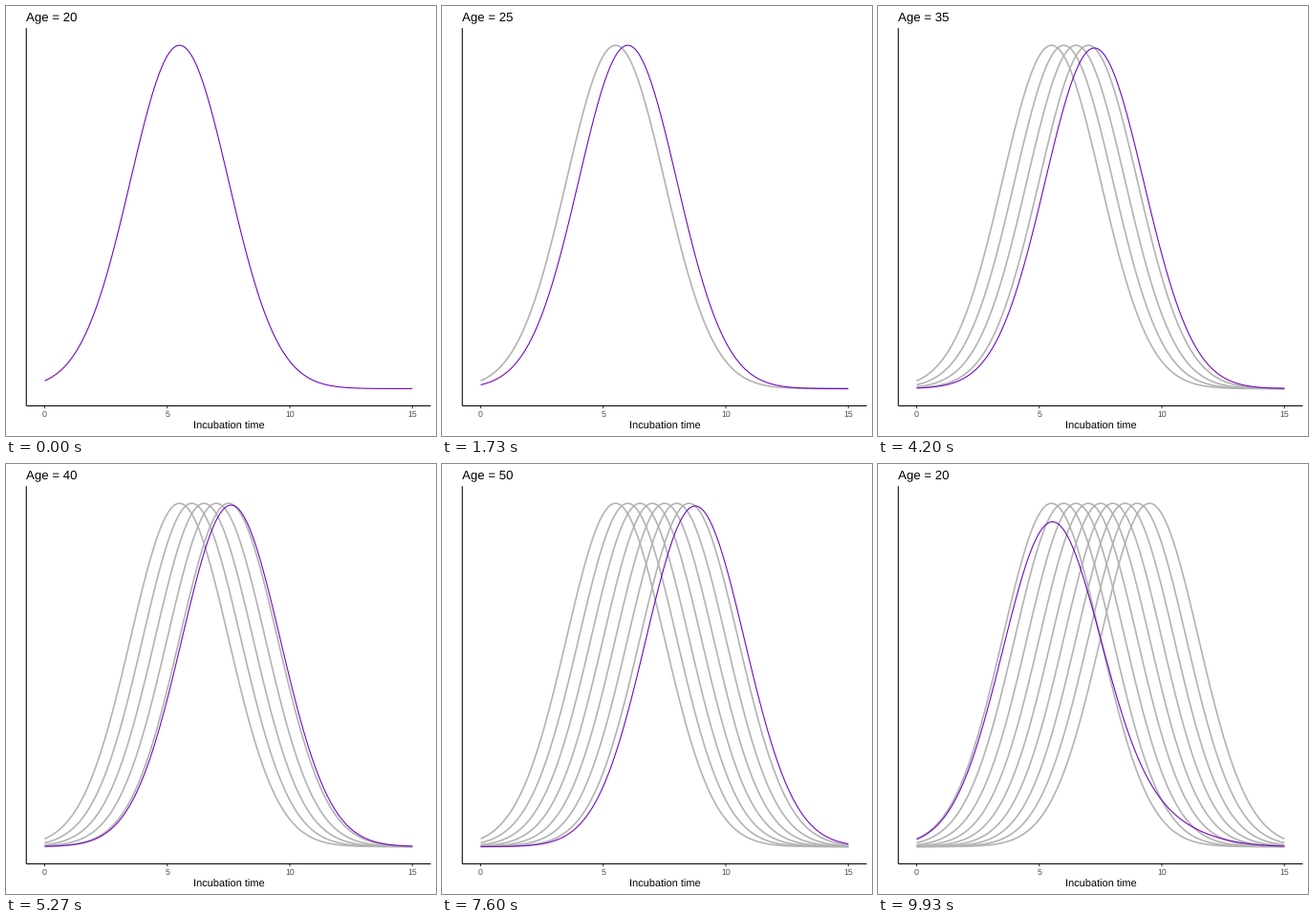
A matplotlib script that plays this animation: 450x450 px, repeating every 10 s.

```python
import numpy as np
import matplotlib.pyplot as plt
from matplotlib.animation import FuncAnimation

plt.rcParams["font.family"] = "Liberation Sans"
plt.rcParams["text.hinting"] = "none"
plt.rcParams["path.simplify"] = False

SIZE, DPI = 450, 72
FRAMES, LOOP_MS = 150, 10000
STEPS = 8                                     # frames per transition
STARTS = [9, 26, 43, 60, 77, 94, 111, 127, 143]

LEFT, RIGHT, TOP, BOTTOM = 21.25, 444.5, 23.2, 418.4
PURPLE, GREY = "#7000c0", "#b3b3b3"
LINE = 1.07

ages = [20 + 5 * i for i in range(len(STARTS))]
times = np.linspace(0, 15, 500)
curves = [np.exp(-(times - (5.5 + 0.5 * i)) ** 2 / 8) for i in range(len(ages))]


def to_x(t):
    return LEFT + (RIGHT - LEFT) * (0.05 + t / 15) / 1.1


def to_y(v):
    return BOTTOM - (BOTTOM - TOP) * (0.05 + v) / 1.1


def ease(t):
    """Cubic in-out."""
    return 4 * t ** 3 if t < 0.5 else 1 - 4 * (1 - t) ** 3


def pose(frame):
    """Return the state index and the progress towards the next state."""
    state = 0
    for start in STARTS:
        if frame < start:
            break
        t = (frame - start + 1) / STEPS
        if t < 1:
            return state, t
        state += 1
    return state, 0


fig = plt.figure(figsize=(SIZE / DPI, SIZE / DPI), dpi=DPI, facecolor="white")
ax = fig.add_axes([0, 0, 1, 1])
ax.set_xlim(0, SIZE)
ax.set_ylim(SIZE, 0)
ax.axis("off")


def stroke(xs, ys, color, width=LINE, **kw):
    return ax.plot(xs, ys, color=color, lw=width, solid_capstyle="butt",
                   solid_joinstyle="round", snap=False, **kw)[0]


def label(x, y, text, size, color="black", ha="center"):
    return ax.text(x, y, text, size=size, color=color, ha=ha, va="baseline")


xs = to_x(times)
marks = [stroke(xs, to_y(c), GREY, 1.65, zorder=2) for c in curves]
curve = stroke(xs, to_y(curves[0]), PURPLE, zorder=3)

for tick in (0, 5, 10, 15):
    stroke([to_x(tick)] * 2, [BOTTOM, BOTTOM + 2.75], "#333333")
    label(to_x(tick), 430, str(tick), 8.8, "#4d4d4d")
stroke([LEFT, LEFT], [TOP, BOTTOM], "black", zorder=4)
stroke([LEFT, RIGHT], [BOTTOM, BOTTOM], "black", zorder=4)
label((LEFT + RIGHT) / 2, 443.3, "Incubation time", 11)
title = label(LEFT - 0.2, 15, "", 13.2, ha="left")


def draw(frame):
    state, t = pose(frame)
    following = (state + 1) % len(ages)
    k = ease(t)
    curve.set_ydata(to_y((1 - k) * curves[state] + k * curves[following]))
    for i, mark in enumerate(marks):
        mark.set_visible(i < state or (i == state and t > 0))
    title.set_text(f"Age = {ages[following if t > 0.5 else state]}")
    return [*marks, curve, title]


anim = FuncAnimation(fig, draw, frames=FRAMES, interval=LOOP_MS / FRAMES,
                     repeat=True, repeat_delay=0)
plt.show()
```
